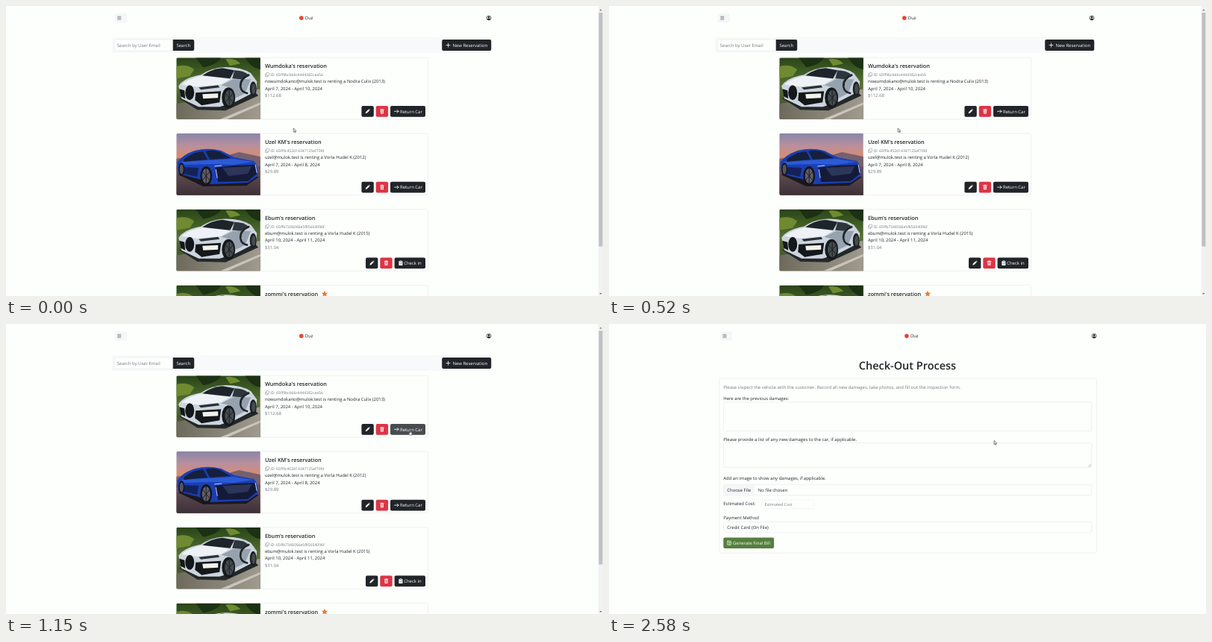
An HTML page that plays this animation: 800x389 px, repeating every 2610 ms.

```html
<!DOCTYPE html>
<html lang="en">
<head>
<meta charset="utf-8">
<title>Reservations</title>
<style>
  html, body { margin: 0; width: 100%; height: 100%; overflow: hidden; background: #fdfffd; }
  svg { display: block; width: 100vw; height: 100vh; }
  text {
    font: 5.95px "Open Sans", "Noto Sans", sans-serif;
    fill: #212529; white-space: pre; text-rendering: geometricPrecision;
  }
  .muted { fill: #74797e; }
  .on-dark { fill: #fff; }
  .title { font-size: 7.3px; font-weight: 600; }
  .small { font-size: 5.05px; }
  .hint { font-size: 5.3px; }
  .h1 { font-size: 14.5px; font-weight: 600; text-anchor: middle; }
  .dark { fill: #212529; }
  .red { fill: #dc3545; }
  .box { fill: #fdfffd; stroke: #dfe3e3; stroke-width: .5; }
  .icon { fill: none; stroke: #fff; stroke-width: .8; stroke-linecap: round; stroke-linejoin: round; }

  .list, .form, .arrow, .hand, .pointer, .hot { animation: 2610ms linear infinite; }
  .list { animation-name: list; animation-timing-function: step-end; }
  .form { animation-name: form; animation-timing-function: step-end; }
  .arrow { animation-name: arrow; animation-timing-function: step-end; }
  .hand { animation-name: hand; animation-timing-function: step-end; }
  .pointer { animation-name: move; }
  .hot { animation-name: hover; }

  @keyframes list { 0% { visibility: visible } 48.2%, 100% { visibility: hidden } }
  @keyframes form { 0% { visibility: hidden } 48.2%, 100% { visibility: visible } }
  @keyframes arrow { 0% { visibility: visible } 35% { visibility: hidden } 48.2%, 100% { visibility: visible } }
  @keyframes hand { 0% { visibility: hidden } 35% { visibility: visible } 48.2%, 100% { visibility: hidden } }
  @keyframes hover { 0%, 35% { fill: #212529 } 40%, 100% { fill: #484c4f } }
  @keyframes move {
    0%, 18.4% { transform: translate(385.3px, 163.8px); animation-timing-function: ease-in; }
    26.8% { transform: translate(421.8px, 162.5px); animation-timing-function: ease-out; }
    38%, 62.8% { transform: translate(541.2px, 142.6px); }
    72% { transform: translate(534px, 145px); }
    98.9%, 100% { transform: translate(516px, 156.2px); }
  }
</style>
</head>
<body>
<svg viewBox="0 0 800 389" preserveAspectRatio="none">
  <defs>
    <linearGradient id="trees" x2="0" y2="1">
      <stop offset="0" stop-color="#2a4419"/>
      <stop offset=".2" stop-color="#3c5922"/>
      <stop offset=".45" stop-color="#5a7034"/>
      <stop offset=".65" stop-color="#4a5a30"/>
    </linearGradient>
    <linearGradient id="road" x2="1" y2="0">
      <stop offset="0" stop-color="#6d6a5c"/>
      <stop offset="1" stop-color="#a09a8f"/>
    </linearGradient>
    <linearGradient id="dusk" x2="0" y2="1">
      <stop offset="0" stop-color="#8886a8"/>
      <stop offset=".2" stop-color="#b98f9c"/>
      <stop offset=".38" stop-color="#d98c70"/>
      <stop offset=".46" stop-color="#8a6266"/>
    </linearGradient>
    <linearGradient id="ground" x2="0" y2="1">
      <stop offset="0" stop-color="#6b545a"/>
      <stop offset="1" stop-color="#3b3036"/>
    </linearGradient>
    <clipPath id="frame"><path d="M2 0H112.5V82.7H2Q0 82.7 0 80.7V2Q0 0 2 0Z"/></clipPath>

    <g id="white-car" clip-path="url(#frame)">
      <path fill="url(#trees)" d="M0 0H113V83H0Z"/>
      <path fill="#6f8a30" d="M0 12Q14 8 24 16L18 25 0 28ZM66 2Q78 0 86 8L72 11Z"/>
      <path fill="#1c3013" d="M26 0H60Q56 9 36 13ZM92 0H113V16Q100 14 92 0Z"/>
      <path fill="url(#road)" d="M0 62L113 42V83H0Z"/>
      <path fill="#c9c4b9" d="M58 83L113 60V63L68 83Z"/>
      <path fill="#23282a" d="M3 54L28 70 66 71 110 51 104 45 60 62Z"/>
      <path fill="#ccd4dd" d="M3 38Q10 27 33 23Q46 14 62 13Q86 12 100 21L108 32 107 45 78 60 58 66 30 66 7 55Z"/>
      <path fill="#eef2f6" d="M7 36Q18 27 36 24L72 29 60 36 28 39Z"/>
      <path fill="#96a2ae" d="M60 37L76 29 100 29 92 48 80 54 72 40Z"/>
      <path fill="#1d242a" d="M35 24Q47 15 62 14L78 17 72 28Z"/>
      <path fill="#2d363d" d="M78 17Q90 17 97 23L87 29 75 28Z"/>
      <path fill="none" stroke="#20262a" stroke-width="2.6" d="M98 23Q85 28 86 39Q87 47 96 48"/>
      <path fill="#14181a" d="M4 42L11 44 12 55 6 52ZM26 47L60 45 58 60 34 64 25 57Z"/>
      <ellipse cx="18" cy="47" rx="6" ry="10" fill="#14181a"/>
      <path fill="#2a3034" d="M30 40L56 37 58 40 33 43Z"/>
      <path fill="#f2f2ec" d="M35 49L56 48V54L36 55Z"/>
      <ellipse cx="70" cy="54" rx="9" ry="14" fill="#171a1c"/>
      <ellipse cx="71" cy="54" rx="6" ry="10.5" fill="#454c51"/>
      <path stroke="#1a1e20" d="M71 44V64M66 48L76 60M76 48L66 60"/>
      <ellipse cx="103" cy="42" rx="4.5" ry="10" fill="#1b1f21"/>
      <ellipse cx="103.5" cy="42" rx="2.6" ry="7" fill="#454c51"/>
    </g>

    <g id="blue-car" clip-path="url(#frame)">
      <path fill="url(#dusk)" d="M0 0H113V83H0Z"/>
      <path fill="#75606f" d="M0 34L24 30 60 32 84 25 113 31V48H0Z"/>
      <path fill="url(#ground)" d="M0 44H113V83H0Z"/>
      <path fill="#1b181f" d="M2 55L36 71 94 70 111 58Z"/>
      <path fill="#1a3fb4" d="M1 39Q8 29 22 24Q40 18 60 23L78 32 104 37Q110 43 109 57L96 66 46 68 30 61 3 54Z"/>
      <path fill="#2c5bd6" d="M6 38L42 36 76 34 103 38 76 42 50 41 10 42Z"/>
      <path fill="#15203d" d="M10 35Q22 25 36 24L42 35 10 38ZM39 24Q50 21 59 25L73 33 45 35Z"/>
      <path fill="#142259" d="M4 45L30 46 28 58 5 53Z"/>
      <path fill="#141a38" d="M52 46L76 43 105 42 108 54 96 64 56 65Z"/>
      <path fill="#2d3558" d="M62 46L101 44 96 54 70 57Z"/>
      <path stroke="#d9e3ff" stroke-width=".9" d="M51 44L61 43M53 48L55 60M106 42L108 53"/>
      <ellipse cx="40" cy="57" rx="8" ry="13" fill="#15161d"/>
      <ellipse cx="40" cy="57" rx="5.5" ry="10" fill="#625f69"/>
      <path stroke="#1c1c24" d="M40 47V67M35 51L45 63M45 51L35 63"/>
      <ellipse cx="7" cy="48" rx="4" ry="9" fill="#17171f"/>
      <ellipse cx="7" cy="48" rx="2.5" ry="6.5" fill="#56545e"/>
    </g>

    <g id="pencil"><path fill="#fff" d="M-2.9 2.9L-2.3 .8 1.1 -2.6 2.6 -1.1 -.8 2.3ZM1.5 -3L2.1 -3.4 3.4 -2.1 3 -1.5Z"/></g>
    <g id="trash">
      <path fill="#fff" d="M-2.7 -2.7H-1L-.6 -3.3H.6L1 -2.7H2.7V-1.8H-2.7ZM-2.2 -1.4H2.2L1.8 3.3H-1.8Z"/>
      <path stroke="#dc3545" stroke-width=".5" d="M-.9 -.7V2.5M0 -.7V2.5M.9 -.7V2.5"/>
    </g>
    <g id="go"><path class="icon" d="M-2.8 0H2.7M.8 -1.9L2.7 0 .8 1.9"/></g>
    <g id="board">
      <path fill="#fff" d="M-2.5 -2.5H-1.2V-3.2H1.2V-2.5H2.5V3.2H-2.5Z"/>
      <path fill="none" stroke="#212529" stroke-width=".6" d="M-1.2 .6L-.3 1.5 1.4 -.6M-1.2 -1.9H1.2"/>
    </g>
    <g id="copy" fill="none" stroke="#7a8085" stroke-width=".5">
      <rect x="1.6" width="3.7" height="3.7" rx=".5"/>
      <path d="M1.6 1.6H.4V5.2H3.9V3.7"/>
    </g>

    <g id="head">
      <rect x="146.3" y="10.3" width="15.2" height="11.6" rx="2" fill="#f5f6f7" stroke="#eceeef" stroke-width=".4"/>
      <path stroke="#55595c" stroke-width=".7" d="M149.3 14.2H154.3M149.3 16.1H154.3M149.3 18H154.3"/>
      <circle cx="395.8" cy="16.1" r="2.8" fill="#e8442f"/>
      <text x="400.8" y="18.4">Duz</text>
      <circle cx="647" cy="16" r="2.9" fill="none" stroke="#15181a" stroke-width=".7"/>
      <circle cx="647" cy="15.2" r="1.2" fill="#15181a"/>
      <path fill="#15181a" d="M644.8 17.8Q647 15.6 649.2 17.8Q647 20 644.8 17.8Z"/>
    </g>
  </defs>

  <g class="list">
    <use href="#head"/>
    <rect x="142" y="42" width="508.5" height="21" fill="#f8f9fa"/>
    <rect class="box" x="145" y="45" width="80" height="15" rx="2"/>
    <text class="muted" x="148.8" y="55">Search by User Email</text>
    <path class="dark" d="M223.7 45H250.2Q252.2 45 252.2 47V58Q252.2 60 250.2 60H223.7Z"/>
    <text class="on-dark" x="228.5" y="55">Search</text>
    <rect class="dark" x="584.2" y="45" width="66" height="15" rx="2"/>
    <path class="icon" d="M590 52.5H595M592.5 50V55"/>
    <text class="on-dark" x="598.6" y="55">New Reservation</text>
    <g id="cards"></g>
    <path fill="#f1f2f1" d="M793.6 0H800V389H793.6Z"/>
    <path fill="#bfc1c0" d="M794.4 9H799.4V322.5H794.4Z"/>
    <path fill="#707372" d="M795.2 6.2L796.9 4.2 798.6 6.2ZM795.2 385L796.9 387 798.6 385Z"/>
  </g>

  <g class="form">
    <use href="#head" x="3.1"/>
    <text class="h1" x="400" y="60.6">Check-Out Process</text>
    <rect class="box" x="148" y="73.2" width="505.5" height="234" rx="2"/>
    <text class="muted" x="153.3" y="87">Please inspect the vehicle with the customer. Record all new damages, take photos, and fill out the inspection form.</text>
    <text x="153.3" y="102.4">Here are the previous damages:</text>
    <rect class="box" x="153.5" y="104.8" width="493.3" height="38.7" rx="2"/>
    <text x="153.3" y="157.2">Please provide a list of any new damages to the car, if applicable.</text>
    <rect class="box" x="153.5" y="159.6" width="493.3" height="32.7" rx="2"/>
    <path stroke="#73787b" stroke-width=".5" d="M642.4 191.6L645.9 188.1M644.3 191.6L645.9 190"/>
    <text x="153.3" y="209.4">Add an image to show any damages, if applicable.</text>
    <rect class="box" x="153.5" y="215.3" width="493.3" height="14.4" rx="2"/>
    <path fill="#f5f6f7" d="M153.8 215.6H195V229.4H153.8Z"/>
    <text x="158.3" y="224.8">Choose File</text>
    <text x="199.8" y="224.8">No file chosen</text>
    <text x="153.3" y="242.8">Estimated Cost:</text>
    <rect class="box" x="205" y="235.8" width="70" height="12" rx="1.5" style="stroke:#e9ecee"/>
    <text class="muted hint" x="208.6" y="244">Estimated Cost</text>
    <text x="153.3" y="261.7">Payment Method</text>
    <rect class="box" x="153.5" y="265.6" width="493.3" height="14.4" rx="2"/>
    <text x="158.3" y="275.2">Credit Card (On File)</text>
    <rect x="153.3" y="286.4" width="67.8" height="14.5" rx="2" fill="#557f3d"/>
    <rect class="icon" x="158.6" y="291" width="5" height="5.4" rx=".5" style="stroke-width:.6"/>
    <path class="icon" style="stroke-width:.6" d="M160 292.5H162.3M160 293.8H162.3M160 295.1H162.3"/>
    <text class="on-dark" x="166" y="296.3">Generate Final Bill</text>
  </g>

  <g class="pointer">
    <path class="arrow" fill="#fff" stroke="#222" stroke-width=".6" d="M0 0V5.2L1.2 4.2 2 6 2.9 5.6 2.1 3.9H3.6Z"/>
    <path class="hand" fill="#fff" stroke="#222" stroke-width=".5" d="M-.5 .6Q0 -.2 .5 .6V2.6L2.6 3.1Q3 3.4 2.9 4.4L2.4 6.4H-.1L-1.8 4.2Q-1.7 3.4 -.5 4.1Z"/>
  </g>
</svg>
<script>
  const cards = [
    { name: 'Wumdoka', id: '65ff9bcb66c4444382cea56', mail: 'nowumdokano', car: 'Nodra Culix (2013)',
      dates: 'April 7, 2024 - April 10, 2024', price: '$112.68', photo: 'white', hot: true },
    { name: 'Uzel KM', id: '65ff9c452d14347125ef70fd', mail: 'uzel', car: 'Vorla Hudel K (2012)',
      dates: 'April 7, 2024 - April 8, 2024', price: '$29.89', photo: 'blue' },
    { name: 'Ebum', id: '65ffb7348366e5f85654096f', mail: 'ebum', car: 'Vorla Hudel K (2015)',
      dates: 'April 10, 2024 - April 11, 2024', price: '$31.04', photo: 'white', checkIn: true },
    { name: 'zommi', photo: 'white', star: true }
  ];

  const text = (x, y, str, cls = '') => `<text class="${cls}" x="${x}" y="${y}">${str}</text>`;
  const icon = (name, x, y) => `<use href="#${name}" x="${x}" y="${y}"/>`;
  const button = (x, w, cls) => `<rect class="${cls}" x="${x}" y="64.7" width="${w}" height="14.8" rx="2"/>`;

  function actions({ checkIn, hot }) {
    const x = checkIn ? 253.8 : 248.2;
    const main = x + 38.6;
    return button(x, 16.4, 'dark') + icon('pencil', x + 8.2, 72.1) +
      button(x + 19.3, 16.4, 'red') + icon('trash', x + 27.5, 72.1) +
      button(main, 333.8 - main, hot ? 'dark hot' : 'dark') +
      icon(checkIn ? 'board' : 'go', main + 8.3, 72.1) +
      text(checkIn ? 305 : 299.8, 74.4, checkIn ? 'Check in' : 'Return Car', 'on-dark');
  }

  function details(c) {
    return icon('copy', 119, 20.4) + text(126, 25.2, 'ID: ' + c.id, 'muted small') +
      text(118.7, 34.1, `${c.mail}@mulok.test is renting a ${c.car}`) +
      text(118.7, 43.7, c.dates) + text(118.7, 53, c.price, 'muted') + actions(c);
  }

  const star = '<path fill="#e87a35" transform="translate(198.8 11.6)" ' +
    'd="M0 -4.3L1.3 -1.4 4.3 -1.2 2 .8 2.7 3.8 0 2.2 -2.7 3.8 -2 .8 -4.3 -1.2 -1.3 -1.4Z"/>';

  document.getElementById('cards').innerHTML = cards.map((c, i) =>
    `<g transform="translate(228.2 ${69.2 + i * 101.75})">
      <rect class="box" width="337.4" height="82.7" rx="2.3"/>
      ${icon(c.photo + '-car', 0, 0)}
      ${text(118.7, 14.2, c.name + "'s reservation", 'title')}
      ${c.star ? star : details(c)}
    </g>`).join('');
</script>
</body>
</html>
```
